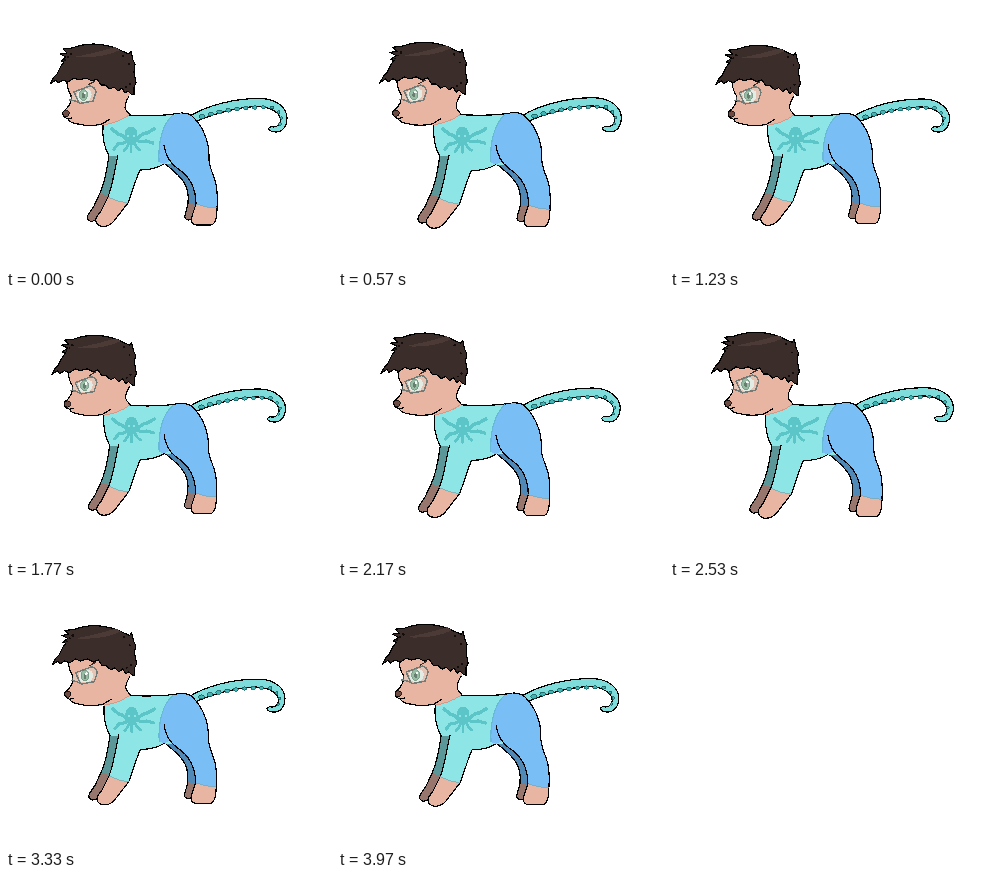
An HTML page that plays this animation: 326 by 262 pixels, repeating every 4010 ms.

```html
<!DOCTYPE html>
<html lang="en">
<head>
<meta charset="utf-8">
<title>Breathing creature</title>
<style>
  /* a registered number keeps the outline sharp at every size */
  @property --size { syntax: "<number>"; inherits: false; initial-value: 1; }
  html, body { margin: 0; width: 100%; height: 100%; overflow: hidden; background: #fff; }
  svg { display: block; width: 326px; height: 262px; shape-rendering: crispEdges; }
  #body {
    transform-origin: 163px 131px;
    transform: scale(var(--size));
    /* two sine breaths per loop, starting halfway up */
    animation: breathe 1002.5ms cubic-bezier(.37, 0, .63, 1) -501.25ms infinite alternate;
  }
  @keyframes breathe {
    from { --size: .98; }
    to { --size: 1.02; }
  }
  .ink { fill: none; stroke: #000; stroke-width: 1.2; stroke-linejoin: round; stroke-linecap: round; }
  .skin { fill: #e8b5a3; }
  .skin-far { fill: #97776d; }
  .shirt { fill: #8de6e5; }
  .shirt-far { fill: #5b9798; }
  .pants { fill: #79bff5; }
  .pants-far { fill: #5089b6; }
  .tail { fill: #7edcdb; }
  .hair { fill: #3b2d2a; }
  .arm { fill: none; stroke: #5bc5c7; stroke-linecap: round; stroke-linejoin: round; }
</style>
</head>
<body>
<svg viewBox="0 0 326 262">
  <g id="body">
    <!-- tail -->
    <g class="tail"><path class="ink" style="fill:inherit" d="M184 110C200 100 228 92 255 92.500C272 93 281 103 281 112C281 121 276 126 270 126Q264 126 262.500 122.500Q265 119.500 267.500 121Q273 121 274.500 115C275 107 265 101 252 100.500C232 101 208 108 191 115Z"/></g>
    <g id="suckers" fill="#43b3b3" stroke="#145c5e" stroke-width=".8"></g>

    <!-- far legs -->
    <path class="pants-far" d="M158 157C168 165 178 173 181 183Q183 190 182 198L191 201V178L166 153Z"/>
    <path class="skin-far" d="M182 197L179 209Q178 213 182 214L188 213L191 200Z"/>
    <path class="ink" d="M158 157C168 165 178 173 181 183Q183 190 182 198L179 209Q178 213 182 214L187 213"/>
    <path class="shirt-far" d="M103 149C101 162 100 174 94 187L104 192L113 150Z"/>
    <path class="skin-far" d="M94 187L88 200L82 209Q80 214 85 215.500L92 214L104 191Z"/>
    <path class="ink" d="M103 149C101 162 100 174 94 187L88 200L82 209Q80 214 85 215.500L91 214"/>

    <!-- torso and near front leg -->
    <path class="skin" d="M102 190L95 205L90 212Q89 218 94 220Q102 222 108 215L122 197Z"/>
    <path class="shirt" d="M97 118Q112 116 123 109Q152 111 176 107L172 158L158 158Q148 164 134 164C130 172 126 187 122 197Q112 196 102 191C107 178 108 164 111 150L103 150C98 141 96 132 97 118Z"/>
    <path class="ink" d="M97 119C96 132 98 141 103 150M112 149C108 166 107 178 102 191L95 205L90 212Q89 218 94 220Q102 222 108 215L122 197C126 187 130 172 134 164Q148 164 158 158"/>
    <path class="ink" d="M123 109Q152 111 176 107"/>

    <!-- octopus print -->
    <path fill="#5bc5c7" d="M119 134Q117 121 125 121Q133 121 131 134Q129 139 125 139Q121 139 119 134Z"/>
    <g class="arm">
      <path stroke-width="3.500" d="M121 134Q117 129 112 128L106 123M130 134Q136 127 141 127L148 123"/>
      <path stroke-width="3.200" d="M121 135Q117 138 112 138L108 143M130 134Q136 137 140 135L147 137"/>
      <path stroke-width="2.800" d="M123 136Q122 141 118 145M125 137V146M128 136Q130 142 134 144"/>
    </g>
    <path d="M121 130h2m4 0h2" stroke="#8de6e5" stroke-width="1.300"/>

    <!-- hips and near hind leg -->
    <path class="skin" d="M190 197L186 210Q184 218 190 219H204Q210 219 211 201Z"/>
    <path class="pants" d="M167 109L176 107Q184 107 188 112C197 121 203 135 203 150C202 160 207 166 210 178Q212 189 211 202Q200 202 190 198C190 181 182 169 171 162L164 155L158 158L153 156C152 138 156 118 167 109Z"/>
    <path d="M153 156C152 138 156 118 167 109" fill="none" stroke="#66b9d7" stroke-width="1.200"/>
    <path class="ink" d="M176 107Q184 107 188 112C197 121 203 135 203 150C202 160 207 166 210 178Q212 189 211 202Q211 219 204 219H190Q184 218 186 210L190 198C190 181 182 169 171 162Q160 154 158 139"/>
    <path d="M102 191Q112 196 122 197M190 198Q201 202 211 202" fill="none" stroke="#7da9b4" stroke-width=".8"/>

    <!-- head -->
    <path class="skin" d="M60 72Q60 82 65 89Q67 98 57 106Q56 111 62 113Q64 117 72 118Q84 121 97 119Q111 117 124 109Q118 103 120 98L124 88L116 70Z"/>
    <path class="ink" d="M61 76Q61 83 65 89Q67 98 57 106Q56 111 62 113Q64 117 72 118Q84 121 96 118L104 113"/>
    <path class="ink" d="M123 90Q117 100 120 104L124 109"/>
    <path d="M97 119Q112 117 123 109" fill="none" stroke="#d3998b" stroke-width="1"/>
    <path fill="#6f4c43" stroke="#000" stroke-width=".8" d="M57 106Q60 103 63 106Q64 110 60 111Q56 110 57 106Z"/>
    <path class="ink" stroke-width=".8" d="M62 113L66 112"/>

    <!-- glasses and eye -->
    <path d="M71 87Q79 80 85 85Q87 92 82 95Q74 97 72 93Z" fill="#e6efe6"/>
    <ellipse cx="77.500" cy="89" rx="4" ry="5.500" fill="#79aa8a" stroke="#467057" stroke-width=".8"/>
    <ellipse cx="77.500" cy="89.500" rx="1.500" ry="2.700" fill="#38533f"/>
    <circle cx="79" cy="87" r="1.300" fill="#fff"/>
    <path d="M68 86L84 80Q89 81 90 86L87 95L74 97.500Q70 95 63 94" fill="#d6e4de" fill-opacity=".3"/>
    <path d="M63 94Q69 94 74 97.500L87 95L90 86Q89 81 84 80L68 86L73 97" fill="none" stroke="#727b76" stroke-width="1.500" stroke-linejoin="round"/>
    <path d="M82 79L89 75" fill="none" stroke="#3b2d2a" stroke-width="1.200"/>

    <!-- hair -->
    <g class="hair"><path class="ink" style="fill:inherit" d="M44 78L48 71L51 68L55 60L58 56L55 55L60 51L54 48L61 47L57 43L66 42Q77 38 88 38Q106 39 116 45L123 48L125 45L127 54L129 58L128 66L130 77L128 81L128 89L125 88L122 85L119 87L116 82L112 85L108 81L104 83L99 79L95 79L91 73L86 75L80 72L73 74L68 72L62 76L57 74L52 77L50 74Z"/></g>
    <path d="M68 51Q90 47 109 41L114 44Q95 53 68 51Z" fill="#4c3a36"/>
    <g id="flecks" fill="#120c0b"></g>
  </g>
</svg>
<script>
  const addDots = (id, dots) => {
    const group = document.getElementById(id);
    for (const [x, y, rx, ry = rx] of dots) {
      const dot = document.createElementNS("http://www.w3.org/2000/svg", "ellipse");
      Object.entries({ cx: x, cy: y, rx, ry }).forEach(([k, v]) => dot.setAttribute(k, v));
      group.append(dot);
    }
  };

  // suckers follow the underside of the tail, shrinking to the tip
  const suckers = Array.from({ length: 9 }, (_, i) => {
    const u = i / 8;
    const x = 196 + 70 * u;
    const y = 110.5 - 21 * u + 12 * u * u;
    return [x, y, 3 - u, 2 - 0.5 * u];
  });
  addDots("suckers", [...suckers, [272.5, 106.5, 1.5], [275.5, 112, 1.3], [274, 118, 1.2]]);

  addDots("flecks", [[65, 48, 1.4], [59, 54, 1], [62, 51, 1], [117, 50, 1.2], [123, 58, 1], [124, 78, 1.2], [120, 81, 1]]);
</script>
</body>
</html>
```
